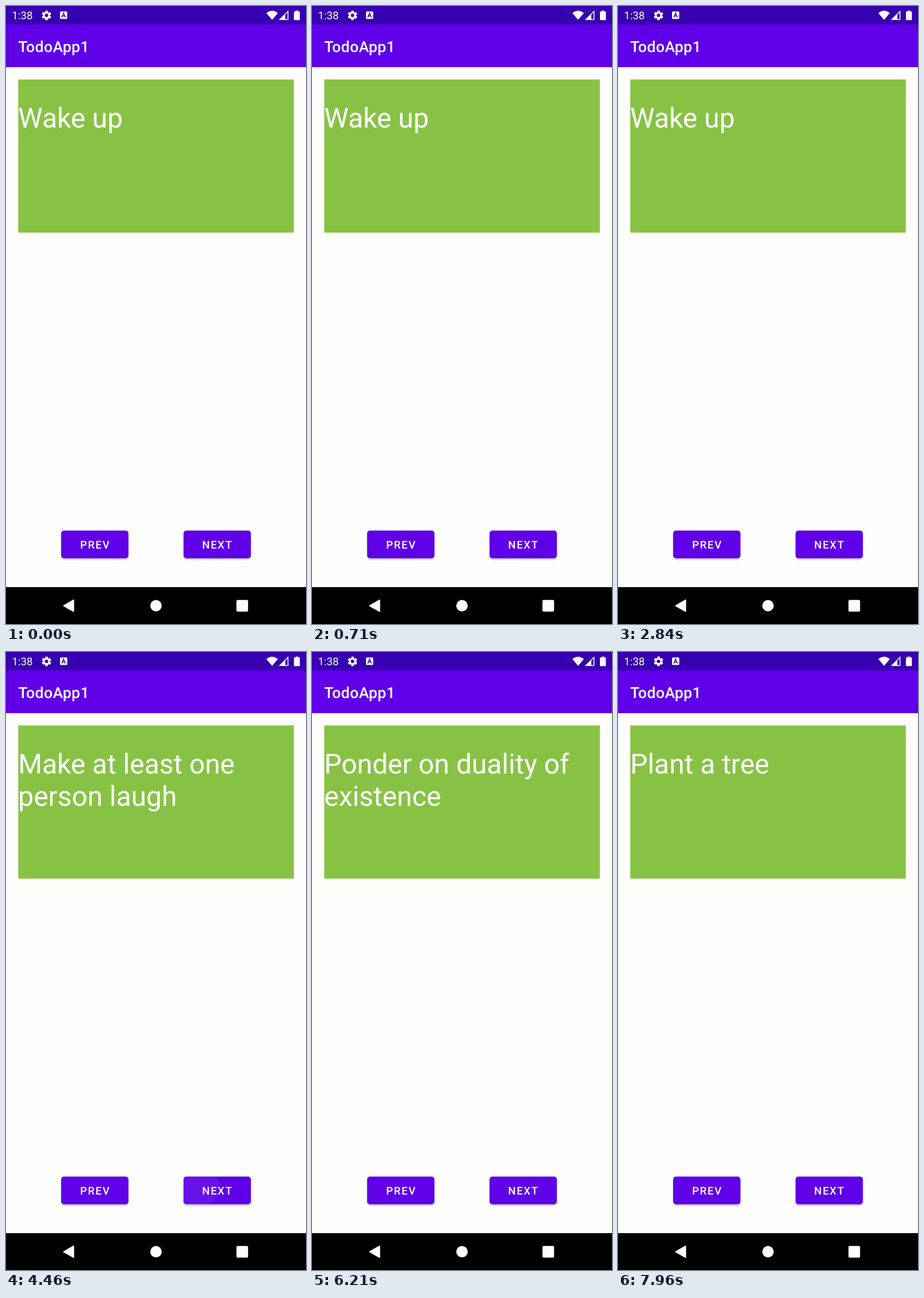
Animation, 522 px wide and 1073 px high, one loop 8 s. Source, as an HTML page:

```html
<!DOCTYPE html>
<html lang="en">
<head>
<meta charset="utf-8">
<title>Todo list</title>
<style>
  html, body { margin: 0; width: 100%; height: 100%; overflow: hidden; background: #fdfdfc; }
  svg { display: block; width: 522px; height: 1073px; font-family: Roboto, sans-serif; fill: #fff; }
  text { text-rendering: geometricPrecision; }
  .clock { font-size: 18.6px; }
  .title { font-size: 26.6px; font-weight: 500; letter-spacing: .0125em; }
  .label { font-size: 18.6px; font-weight: 500; letter-spacing: .0893em; text-anchor: middle; }
  .task { font-size: 47.85px; opacity: 0; }
  .button { fill: #5f00e8; filter: drop-shadow(0 2px 1.5px rgba(0, 0, 0, .32)); }
  #ripple { opacity: 0; }
</style>
</head>
<body>
<svg viewBox="0 0 522 1073">
  <defs>
    <clipPath id="nextShape"><rect x="309" y="910.7" width="117" height="48" rx="5"/></clipPath>
  </defs>

  <rect width="522" height="1073" fill="#fdfdfc"/>
  <rect y="31" width="522" height="75.2" fill="#5f00e8"/>
  <rect width="522" height="32" fill="#3700b0"/>

  <!-- status bar -->
  <text class="clock" x="10.5" y="23">1:38</text>
  <g fill="none" stroke="#fff">
    <circle cx="70.5" cy="16.3" r="4.7" stroke-width="3.4"/>
    <circle cx="70.5" cy="16.3" r="7" stroke-width="2.6" stroke-dasharray="4.3 3.03" stroke-dashoffset="-1.515"/>
  </g>
  <rect x="94" y="9.5" width="12.5" height="13" rx="1.5"/>
  <path d="M97 20L100.2 12L103.4 20M98.2 17.3H102.2" fill="none" stroke="#3700b0" stroke-width="1.5"/>
  <path d="M453 12.2Q463 4.2 473 12.2L463 24Z"/>
  <path d="M476.5 23.4H490.6V9.3Z" fill="none" stroke="#fff" stroke-width="1.5"/>
  <path d="M475.5 24L486 13.5V24Z"/>
  <path d="M501 10.6Q501 9.6 502 9.6H504V8H508.5V9.6H510.3Q511.3 9.6 511.3 10.6V23.4Q511.3 24.4 510.3 24.4H502Q501 24.4 501 23.4Z"/>

  <text class="title" x="21.3" y="79.6">TodoApp1</text>

  <rect x="21.3" y="127.5" width="479.5" height="266" fill="#88c245"/>
  <g id="tasks"></g>

  <rect class="button" x="96" y="910.7" width="117" height="48" rx="5"/>
  <rect class="button" id="next" x="309" y="910.7" width="117" height="48" rx="5"/>
  <g clip-path="url(#nextShape)"><g id="ripple"><circle id="wave" r="1"/></g></g>
  <text class="label" x="155.3" y="942">PREV</text>
  <text class="label" x="368" y="942">NEXT</text>

  <!-- navigation bar -->
  <rect y="1009" width="522" height="64" fill="#000"/>
  <g fill="#fdfdf9">
    <path d="M100.5 1041.3L117.5 1031.5V1051Z" stroke="#fdfdf9" stroke-width="2" stroke-linejoin="round"/>
    <circle cx="261" cy="1041.3" r="10"/>
    <rect x="401" y="1031.3" width="20.2" height="20.2" rx="2"/>
  </g>
</svg>
<script>
  const LOOP = 8000;
  const PRESSES = [2960, 4440, 6550];
  const RELEASE = 110; // from touch to click
  const TASKS = [
    ['Wake up'],
    ['Make at least one', 'person laugh'],
    ['Ponder on duality of', 'existence'],
    ['Plant a tree'],
  ];
  const EASE = 'cubic-bezier(.4, 0, .2, 1)';
  const byId = id => document.getElementById(id);

  // steps: [ms, properties, easing towards the next step]
  function play(el, steps) {
    const frames = steps.map(([ms, props, easing = 'linear']) =>
      ({ offset: ms / LOOP, easing, ...props }));
    el.animate(frames, { duration: LOOP, iterations: Infinity });
  }

  // Repeats one press for every touch, resting in between.
  function playPresses(el, rest, press) {
    const steps = PRESSES.flatMap(start =>
      press.map(([ms, ...step]) => [start + ms, ...step]));
    play(el, [[0, rest], ...steps, [LOOP, rest]]);
  }

  function svg(tag, attrs, parent) {
    const el = document.createElementNS('http://www.w3.org/2000/svg', tag);
    for (const key in attrs) el.setAttribute(key, attrs[key]);
    return parent.appendChild(el);
  }

  TASKS.forEach((lines, i) => {
    const group = svg('g', { class: 'task' }, byId('tasks'));
    lines.forEach((line, row) => {
      svg('text', { x: 21.3, y: 210.5 + row * 56.1 }, group).textContent = line;
    });
    const from = i ? PRESSES[i - 1] + RELEASE : 0;
    const to = i < PRESSES.length ? PRESSES[i] + RELEASE : LOOP;
    const steps = [[from, { opacity: 1 }, 'step-end'], [to, { opacity: 0 }, 'step-end']];
    if (from > 0) steps.unshift([0, { opacity: 0 }, 'step-end']);
    if (to < LOOP) steps.push([LOOP, { opacity: 0 }]);
    play(group, steps);
  });

  const touch = { transform: 'translate(335px, 928px) scale(35)' };
  const filled = { transform: 'translate(367.5px, 934.7px) scale(64)' };
  playPresses(byId('wave'), touch, [
    [0, touch, EASE], [225, filled], [400, filled, 'step-end'], [401, touch],
  ]);

  const alpha = opacity => ({ opacity });
  playPresses(byId('ripple'), alpha(0), [
    [0, alpha(0)], [75, alpha(.24)], [225, alpha(.24)], [375, alpha(0)],
  ]);

  const shadow = (y, blur) =>
    ({ filter: `drop-shadow(0 ${y}px ${blur}px rgba(0, 0, 0, .32))` });
  const low = shadow(2, 1.5), high = shadow(5, 4);
  playPresses(byId('next'), low, [
    [0, low], [100, high], [RELEASE, high], [RELEASE + 100, low],
  ]);
</script>
</body>
</html>
```
